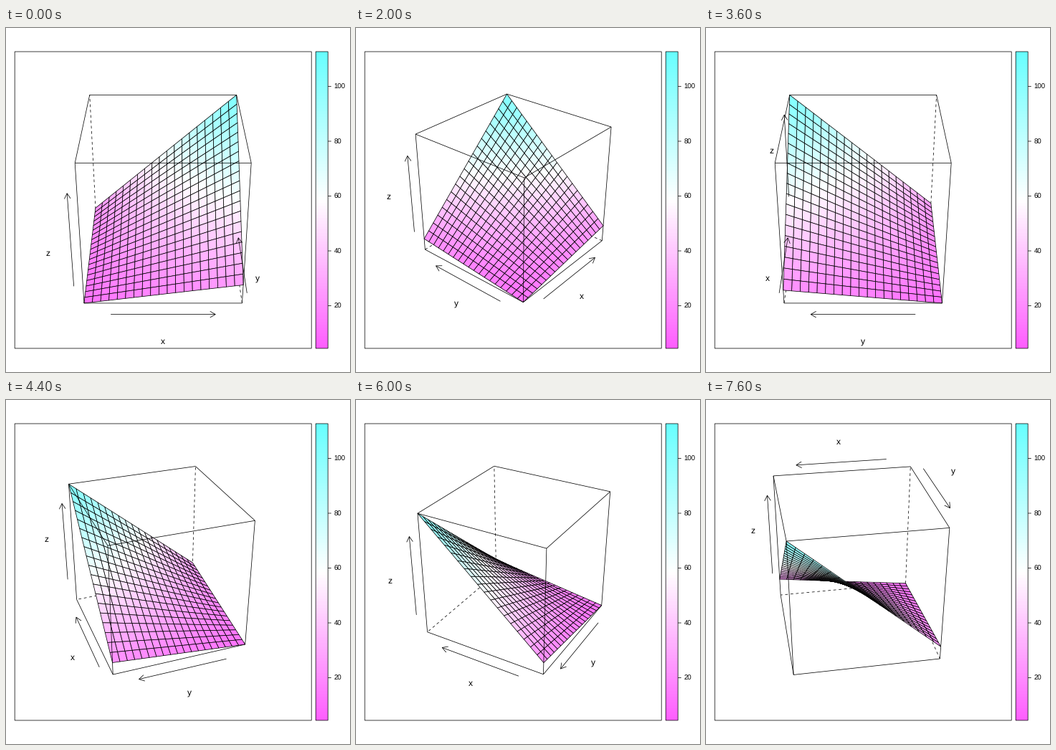
A matplotlib script for the animation above (8 s loop, 480 px wide and 480 px high).

```python
import itertools

import matplotlib.pyplot as plt
import numpy as np
from matplotlib.animation import FuncAnimation
from matplotlib.collections import LineCollection, PolyCollection
from matplotlib.patches import Rectangle

SIZE, DPI = 480, 72            # at 72 dpi one point is one pixel
STEPS, STEP_MS, STEP_DEG = 20, 400, 10
TILT, DISTANCE, ZOOM, PAD = np.radians(-60), 0.2, 0.8, 1.14
CENTRE, PANEL = np.array([219.2, 240]), 414
KEY_X, KEY_W = 432.2, 17
GRID = 20
LINE = 0.75
MAGENTA, WHITE, CYAN = np.array([[255, 94, 255], [255, 255, 255], [104, 255, 255]]) / 255

plt.rcParams.update({"font.family": "Liberation Sans", "text.hinting": "none"})


def ramp(t):
    """Colour of relative height t in 0..1, in 100 bands from magenta to cyan."""
    s = 2 * np.clip(np.floor(t * 100), 0, 99) / 99 - 1
    end = CYAN if s > 0 else MAGENTA
    return WHITE + (end - WHITE) * abs(s)


def rotate(points, angle):
    x, y, z = np.asarray(points, float).T
    c, s = np.cos(angle), np.sin(angle)
    x, y = x * c - y * s, x * s + y * c
    c, s = np.cos(TILT), np.sin(TILT)
    return np.column_stack([x, y * c - z * s, y * s + z * c])


def perspective(rotated):
    return rotated[:, :2] / (1 / DISTANCE - rotated[:, 2:])


def make_view(angle):
    """Return a function from box coordinates to pixels that fits the turned box."""
    box = perspective(rotate(CORNERS, angle))
    low, high = box.min(axis=0), box.max(axis=0)
    middle = (low + high) / 2 / ZOOM
    scale = PANEL * ZOOM / (PAD * (high - low).max())

    def view(points):
        flat = perspective(rotate(points, angle))
        return CENTRE + (flat - middle) * scale * [1, -1]

    return view


CORNERS = np.array(list(itertools.product((-0.5, 0.5), repeat=3)))
EDGES = [(i, j) for i, j in itertools.combinations(range(8), 2)
         if np.count_nonzero(CORNERS[i] != CORNERS[j]) == 1]

# Surface: a plane with an interaction term, as relative height
u, v = np.meshgrid(np.linspace(0, 1, GRID), np.linspace(0, 1, GRID), indexing="ij")
height = 0.143 * u + 0.102 * v + 0.755 * u * v
mesh = np.stack([u, v, height], axis=-1) - 0.5
quads = np.stack([mesh[:-1, :-1], mesh[1:, :-1], mesh[1:, 1:], mesh[:-1, 1:]],
                 axis=2).reshape(-1, 4, 3)
quad_colors = np.array([ramp((q[:, 2].mean() + 0.5 + 0.07) / PAD) for q in quads])


def axis_sides(degrees):
    """Signs of the box edge beside which each axis arrow lies (0 runs along it)."""
    if degrees <= 0:
        return (0, -1, -1), (1, 0, -1), (-1, -1, 0)
    if degrees < 90:
        return (0, -1, -1), (-1, 0, -1), (-1, 1, 0)
    if degrees <= 180:
        return (0, 1, -1), (-1, 0, -1), (1, 1, 0)
    return (0, -1, 1), (-1, 0, 1), (1, -1, 0)


def arrow(tail, tip, length=8.64, spread=np.radians(30)):
    dx, dy = tail - tip
    heading = np.arctan2(dy, dx)
    barbs = [tip + length * np.array([np.cos(heading + a), np.sin(heading + a)])
             for a in (-spread, spread)]
    return [np.array([tail, tip]), np.array([barbs[0], tip, barbs[1]])]


fig = plt.figure(figsize=(SIZE / DPI, SIZE / DPI), dpi=DPI, facecolor="white")
ax = fig.add_axes([0, 0, 1, 1])
ax.axis("off")


def outline(x, y, width, height):
    ax.add_patch(Rectangle((x, y), width, height, fill=False, ec="black",
                           lw=LINE, snap=False, zorder=2))


# Panel frame and colour key
left, top = CENTRE - PANEL / 2
bands = np.array([[ramp((i + 0.5) / 100)] for i in range(100)])
ax.imshow(bands, extent=(KEY_X, KEY_X + KEY_W, top + PANEL, top),
          origin="lower", aspect="auto", interpolation="nearest")
ax.set(xlim=(0, SIZE), ylim=(SIZE, 0))
outline(left, top, PANEL, PANEL)
outline(KEY_X, top, KEY_W, PANEL)
for value in range(20, 101, 20):
    y = 387.5 - (value - 20) * 3.825
    ax.plot([KEY_X + KEY_W, 453.8], [y, y], color="black", lw=LINE,
            snap=False, solid_capstyle="butt")
    ax.text(457.5, y + 3.5, str(value), size=9.6, va="baseline")

hidden = LineCollection([], colors="black", linewidths=LINE,
                        linestyles=[(0, (5, 5))], zorder=3)
surface = PolyCollection([], edgecolors="black", linewidths=LINE, zorder=4)
visible = LineCollection([], colors="black", linewidths=LINE, zorder=5)
arrows = LineCollection([], colors="black", linewidths=LINE, zorder=6)
for collection in (hidden, surface, visible, arrows):
    collection.set_snap(False)
    ax.add_collection(collection, autolim=False)
labels = [ax.text(0, 0, name, size=12, ha="center", va="baseline", zorder=7)
          for name in "xyz"]


def update(step):
    degrees = step * STEP_DEG
    angle = np.radians(degrees)
    view = make_view(angle)

    # Edges that meet a farthest corner are dashed, behind the surface
    depth = rotate(CORNERS, angle)[:, 2]
    far = depth < depth.min() + 1e-6
    corners = view(CORNERS)
    hidden.set_segments([corners[[i, j]] for i, j in EDGES if far[i] or far[j]])
    visible.set_segments([corners[[i, j]] for i, j in EDGES if not (far[i] or far[j])])

    order = np.argsort(rotate(quads.mean(axis=1), angle)[:, 2])
    surface.set_verts(view(quads.reshape(-1, 3)).reshape(-1, 4, 2)[order])
    surface.set_facecolor(quad_colors[order])

    segments = []
    for axis, (sides, label) in enumerate(zip(axis_sides(degrees), labels)):
        edge = np.array(sides) / 2
        along = 0.3 * np.eye(3)[axis]
        tail, tip, anchor = view([1.1 * (edge - along), 1.1 * (edge + along), 1.331 * edge])
        segments += arrow(tail, tip)
        label.set_position(anchor + [-0.5, 4.6])
    arrows.set_segments(segments)
    return hidden, surface, visible, arrows, *labels


animation = FuncAnimation(fig, update, frames=STEPS, interval=STEP_MS,
                          repeat=True, repeat_delay=0, blit=False)
plt.show()
```
